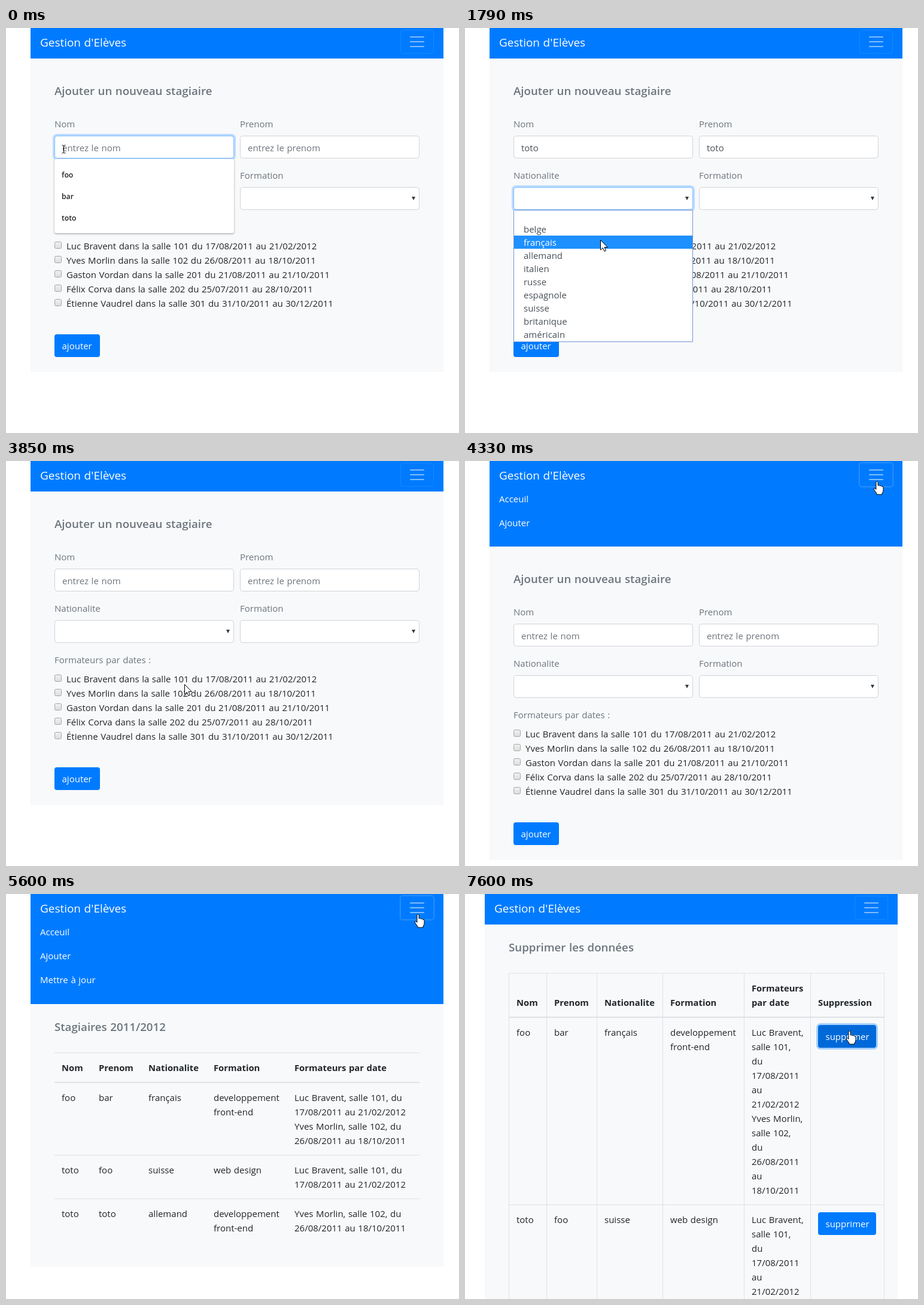
Animation of 757 by 677 pixels, one loop 8 s. Source, as an HTML page with a canvas:

```html
<!DOCTYPE html>
<html lang="fr">
<head>
<meta charset="utf-8">
<title>Gestion d'Elèves</title>
<style>
  html, body { margin: 0; width: 100%; height: 100%; overflow: hidden; background: #fff; }
  canvas { display: block; }
</style>
</head>
<body>
<canvas id="stage" width="757" height="677"></canvas>
<script>
const ctx = document.getElementById('stage').getContext('2d');
const LOOP = 8000;
const BLUE = '#007bff', BLUE_DARK = '#0069d9', GREY = '#6c757d', INK = '#212529', FIELD = '#495057', LINE = '#dee2e6';
const FONTS = { body: '15px', bold: 'bold 14.8px', title: '600 18.7px', brand: '18.95px', small: '600 12.2px' };

const trainers = [
  ['Luc Bravent', 101, '17/08/2011', '21/02/2012'],
  ['Yves Morlin', 102, '26/08/2011', '18/10/2011'],
  ['Gaston Vordan', 201, '21/08/2011', '21/10/2011'],
  ['Félix Corva', 202, '25/07/2011', '28/10/2011'],
  ['Étienne Vaudrel', 301, '31/10/2011', '30/12/2011']
];
const students = [
  { cells: ['foo', 'bar', 'français', 'developpement\nfront-end'], trainers: [0, 1] },
  { cells: ['toto', 'foo', 'suisse', 'web design'], trainers: [0] },
  { cells: ['toto', 'toto', 'allemand', 'developpement\nfront-end'], trainers: [1] }
];
const countries = ['', 'belge', 'français', 'allemand', 'italien', 'russe', 'espagnole', 'suisse', 'britanique', 'américain'];
const courses = ['', 'developpement web', 'web design', 'developpement front-end', 'developpement back-end'];
const links = ['Acceuil', 'Ajouter', 'Mettre à jour', 'Supprimer'];
const headers = ['Nom', 'Prenom', 'Nationalite', 'Formation'];

// Moments of the user's actions, in ms
const AT = {
  nameDone: 290, tabFirst: 460, firstOpen: 530, firstBar: 610, firstToto: 680, firstDone: 760, tabCountry: 1000,
  countryOpen: 1400, countryDone: 2030, courseOpen: 2420, courseDone: 2960, check: 3260, submit: 3640,
  menu: 4213, list: 4840, listMenu: 5390, press: 6480, remove: 6680, removeClick: 7500
};

// The screen refreshes in bursts: start, end, number of refreshes
const bursts = [
  [80, 290, 4], [460, 840, 6], [1000, 1790, 11], [1870, 2640, 11], [2700, 3440, 10], [3530, 4330, 11],
  [4410, 5170, 11], [5250, 5740, 7], [5970, 6520, 8], [6660, 7450, 11], [7530, 7600, 2]
];

// Pointer path: time, x, y
const path = [
  [0, 96, 202], [1080, 96, 202], [1300, 230, 286], [1440, 230, 287], [1790, 226, 354], [1950, 226, 374],
  [2070, 226, 376], [2350, 430, 286], [2450, 430, 290], [2870, 422, 388], [2970, 422, 387], [3220, 87, 388],
  [3300, 87, 388], [3440, 98, 470], [3550, 118, 530], [3670, 118, 530], [4150, 688, 33], [4480, 688, 33],
  [4760, 80, 62], [4860, 80, 62], [5170, 523, 60], [5350, 688, 33], [5970, 688, 33], [6440, 84, 182],
  [6700, 84, 182], [7450, 642, 228]
];

const clamp = (v, lo, hi) => Math.min(hi, Math.max(lo, v));
const within = (t, from, to) => t >= from && t < to;
const inside = (p, x, y, w, h) => p.x >= x && p.x < x + w && p.y >= y && p.y < y + h;

function lastRefresh(t) {
  const burst = bursts.findLast(([start]) => start <= t);
  if (!burst) return 0;
  const [start, end, count] = burst, step = (end - start) / (count - 1);
  return t >= end ? end : start + Math.floor((t - start) / step) * step;
}

// CSS "ease": cubic-bezier(.25, .1, .25, 1)
function ease(x) {
  if (x <= 0) return 0;
  if (x >= 1) return 1;
  let lo = 0, hi = 1, s;
  for (let i = 0; i < 20; i++) {
    s = (lo + hi) / 2;
    if (.75 * s * (1 - s) + s ** 3 < x) lo = s; else hi = s;
  }
  return .3 * (1 - s) ** 2 * s + 3 * (1 - s) * s * s + s ** 3;
}

function pointerAt(t) {
  const i = path.findIndex(k => k[0] > t);
  if (i < 0) {
    const [, x, y] = path.at(-1);
    return { x, y };
  }
  const [t0, x0, y0] = path[i - 1], [t1, x1, y1] = path[i];
  const u = (t - t0) / (t1 - t0), s = u * u * (3 - 2 * u);
  return { x: x0 + (x1 - x0) * s, y: y0 + (y1 - y0) * s };
}

function text(str, x, y, color = INK, font = 'body') {
  ctx.font = `${FONTS[font]} "Open Sans", "Noto Sans", sans-serif`;
  ctx.wordSpacing = '0.7px';
  ctx.fillStyle = color;
  const drop = { title: 7, brand: 7, small: 5 }[font] || 6;
  str.split('\n').forEach((line, i) => ctx.fillText(line, x, y + drop + i * 24));
}

function fill(color, x, y, w, h) {
  ctx.fillStyle = color;
  ctx.fillRect(x, y, w, h);
}

function box(x, y, w, h, r, fillColor, strokeColor) {
  ctx.beginPath();
  if (strokeColor) ctx.roundRect(x + .5, y + .5, w - 1, h - 1, r);
  else ctx.roundRect(x, y, w, h, r);
  if (fillColor) { ctx.fillStyle = fillColor; ctx.fill(); }
  if (strokeColor) { ctx.lineWidth = 1; ctx.strokeStyle = strokeColor; ctx.stroke(); }
}

function ring(x, y, w, h, color) {
  box(x - 3, y - 3, w + 6, h + 6, 7, color);
}

function button(label, x, y, w, hot, focused) {
  if (focused) ring(x, y, w, 38, '#a6d0ff');
  box(x, y, w, 38, 4, hot ? BLUE_DARK : BLUE);
  text(label, x + 12.5, y + 19, '#fff');
}

function field(x, y, focused) {
  if (focused) ring(x, y, 300, 38, '#badbff');
  box(x, y, 300, 38, 4, '#fff', focused ? '#80bdff' : '#ced4da');
}

function input(x, y, value, hint, focused) {
  field(x, y, focused);
  text(value || hint, x + 13, y + 20, value ? FIELD : GREY);
}

function select(x, y, value, focused) {
  field(x, y, focused);
  text(value, x + 17, y + 20, FIELD);
  ctx.fillStyle = '#343a40';
  ctx.beginPath();
  ctx.moveTo(x + 287, y + 16);
  ctx.lineTo(x + 293, y + 16);
  ctx.lineTo(x + 290, y + 22);
  ctx.fill();
}

function suggestions(x, items, active) {
  ctx.save();
  ctx.shadowColor = 'rgba(0,0,0,.4)';
  ctx.shadowBlur = 3;
  ctx.shadowOffsetY = 1;
  box(x, 219, 300, items.length * 36 + 16, 3, '#fff');
  ctx.restore();
  items.forEach((item, i) => {
    if (i === active) fill('#e8e8e8', x, 227 + i * 36, 300, 36);
    text(item, x + 12, 245 + i * 36, '#222', 'small');
  });
}

function options(x, items, pointerY) {
  const active = clamp(Math.floor((pointerY - 303) / 22), 0, items.length - 1);
  fill('#fff', x, 304, 300, items.length * 22 + 1);
  items.forEach((item, i) => {
    const y = 303 + i * 22;
    if (i === active) fill('#1e90ff', x + 1, Math.max(y, 305), 298, y + 22 - Math.max(y, 305));
    text(item, x + 17, y + 11, i === active ? '#fff' : FIELD);
  });
  box(x, 304, 300, items.length * 22 + 1, 0, null, '#7396d6');
}

function checkbox(y, checked) {
  const shade = ctx.createLinearGradient(0, y, 0, y + 12);
  shade.addColorStop(0, '#f2f2f2');
  shade.addColorStop(1, '#dcdcdc');
  box(81, y, 12, 12, 2, shade, '#a5a5a5');
  if (!checked) return;
  ctx.strokeStyle = '#333';
  ctx.lineWidth = 2;
  ctx.stroke(new Path2D(`M83.5 ${y + 6}l2.5 2.8l5-6`));
}

function navbar(x, menu, focused) {
  fill(BLUE, x, 0, 690, 51 + menu);
  text("Gestion d'Elèves", x + 16, 24, '#fff', 'brand');
  box(x + 618, 3, 56, 40, 4, null, '#1a88ff');
  if (focused) box(x + 617, 2, 58, 42, 4, null, '#3392ff');
  ctx.strokeStyle = '#80bdff';
  ctx.lineWidth = 2;
  ctx.lineCap = 'round';
  for (const y of [15, 23, 31]) ctx.stroke(new Path2D(`M${x + 635} ${y}h22`));
  ctx.lineCap = 'butt';
  ctx.save();
  ctx.beginPath();
  ctx.rect(x, 43, 690, menu);
  ctx.clip();
  links.forEach((link, i) => text(link, x + 16, 63 + i * 40, '#fff'));
  ctx.restore();
}

function nameValue(t) {
  if (t < 80 || t >= AT.submit) return '';
  return t < 150 ? 'foo' : t < 220 ? 'bar' : 'toto';
}

function firstValue(t) {
  if (t < AT.firstBar || t >= AT.submit) return '';
  return t < AT.firstToto ? 'bar' : 'toto';
}

function formPage(t, p) {
  fill('#f8f9fa', 41, 51, 690, 524);
  text('Ajouter un nouveau stagiaire', 81, 105, GREY, 'title');
  text('Nom', 81, 160, GREY);
  text('Prenom', 391, 160, GREY);
  text('Nationalite', 81, 246, GREY);
  text('Formation', 391, 246, GREY);
  text('Formateurs par dates :', 81, 332, GREY);
  input(81, 180, nameValue(t), 'entrez le nom', t < AT.tabFirst);
  input(391, 180, firstValue(t), 'entrez le prenom', within(t, AT.tabFirst, AT.tabCountry));
  select(81, 266, within(t, AT.countryDone, AT.submit) ? countries[3] : '', within(t, AT.tabCountry, AT.courseOpen));
  select(391, 266, within(t, AT.courseDone, AT.submit) ? courses[3] : '', within(t, AT.courseOpen, AT.check));
  trainers.forEach(([name, room, from, to], i) => {
    checkbox(357 + i * 24, i === 1 && within(t, AT.check, AT.submit));
    text(`${name} dans la salle ${room} du ${from} au ${to}`, 101, 364 + i * 24);
  });
  button('ajouter', 81, 512, 76, inside(p, 81, 512, 76, 38) && t < AT.menu);

  const names = ['foo', 'bar', 'toto'], firsts = ['bar', 'toto'];
  if (t < AT.nameDone) suggestions(81, names, names.indexOf(nameValue(t)));
  if (within(t, AT.firstOpen, AT.firstDone)) suggestions(391, firsts, firsts.indexOf(firstValue(t)));
  if (within(t, AT.countryOpen, AT.countryDone)) options(81, countries, p.y);
  if (within(t, AT.courseOpen, AT.courseDone)) options(391, courses, p.y);
}

function listPage() {
  const cols = [93, 155, 238, 347, 482];
  fill('#f8f9fa', 41, 51, 690, 439);
  text('Stagiaires 2011/2012', 81, 89, GREY, 'title');
  fill(LINE, 81, 132, 610, 1);
  fill(LINE, 81, 181, 610, 2);
  [...headers, 'Formateurs par date'].forEach((h, i) => text(h, cols[i], 157, INK, 'bold'));
  let y = 183;
  students.forEach((row, r) => {
    if (r) fill(LINE, 81, y++, 610, 1);
    row.cells.forEach((cell, i) => text(cell, cols[i], y + 24));
    row.trainers.forEach((id, i) => {
      const [name, room, from, to] = trainers[id];
      text(`${name}, salle ${room}, du\n${from} au ${to}`, cols[4], y + 24 + i * 48);
    });
    y += 24 + row.trainers.length * 48;
  });
}

function removePage(t, p) {
  const cols = [86, 149, 233, 343, 479, 590];
  fill('#f8f9fa', 33, 51, 690, 626);
  text('Supprimer les données', 73, 89, GREY, 'title');
  for (const x of [73, 136, 220, 330, 466, 577, 700]) fill(LINE, x, 132, 1, 545);
  fill(LINE, 73, 132, 628, 1);
  fill(LINE, 73, 205, 628, 2);
  headers.forEach((h, i) => text(h, cols[i], 181, INK, 'bold'));
  text('Formateurs\npar date', cols[4], 157, INK, 'bold');
  text('Suppression', cols[5], 181, INK, 'bold');
  let y = 207;
  students.slice(0, 2).forEach((row, r) => {
    if (r) fill(LINE, 73, y++, 628, 1);
    row.cells.forEach((cell, i) => text(cell, cols[i], y + 24));
    row.trainers.forEach((id, i) => {
      const [name, room, from, to] = trainers[id];
      text(`${name},\nsalle ${room},\ndu\n${from}\nau\n${to}`, cols[4], y + 24 + i * 144);
    });
    button('supprimer', 590, y + 12, 97, inside(p, 590, y + 12, 97, 38), !r && t >= AT.removeClick);
    y += 24 + row.trainers.length * 144;
  });
}

const shapes = {
  arrow: new Path2D('M0 0V16.5L3.8 13L6.4 18.8L9 17.7L6.5 12H11.7Z'),
  hand: new Path2D('M-1.6 1.5Q0-.8 1.6 1.5V7.5Q4 6.2 5 8.3Q7 7 8 9.2Q10.5 8.3 10.5 11V15Q10.5 18 8.5 20.5V22.5H-.5V21Q-2 18.5-5 14.5Q-5.8 12-3.8 12L-1.6 14Z'),
  beam: new Path2D('M-3-6.5H-1L0-5.5L1-6.5H3M0-5.5V5.5M-3 6.5H-1L0 5.5L1 6.5H3')
};

function pointerShape(t, p, menu) {
  if (t < AT.menu && inside(p, 81, 180, 300, 38)) return 'beam';
  if (inside(p, 659, 3, 56, 40)) return 'hand';
  if (menu > 0 && inside(p, 41, 44, 109, menu)) return 'hand';
  if (t < AT.list && inside(p, 81, 512, 76, 38)) return 'hand';
  if (t >= AT.remove && inside(p, 590, 219, 97, 38)) return 'hand';
  return 'arrow';
}

function drawPointer(shape, p) {
  ctx.save();
  ctx.translate(Math.round(p.x) + .5, Math.round(p.y) + .5);
  ctx.lineWidth = 1;
  ctx.lineJoin = 'round';
  ctx.strokeStyle = '#000';
  if (shape !== 'beam') {
    ctx.fillStyle = '#fff';
    ctx.fill(shapes[shape]);
  }
  ctx.stroke(shapes[shape]);
  ctx.restore();
}

function draw(t) {
  const p = pointerAt(t);
  const page = t < AT.list ? formPage : t < AT.remove ? listPage : removePage;
  const menuStart = page === formPage ? AT.menu : page === listPage ? AT.listMenu : Infinity;
  const menu = Math.round(160 * ease((t - menuStart) / 350));
  const focused = t >= menuStart && t < AT.press;
  fill('#fff', 0, 0, 757, 677);
  ctx.save();
  ctx.translate(0, menu);
  page(t, p);
  ctx.restore();
  navbar(page === removePage ? 33 : 41, menu, focused);
  drawPointer(pointerShape(t, p, menu), p);
}

function tick(now) {
  draw(lastRefresh(now % LOOP));
  requestAnimationFrame(tick);
}
draw(0);
requestAnimationFrame(tick);
</script>
</body>
</html>
```
